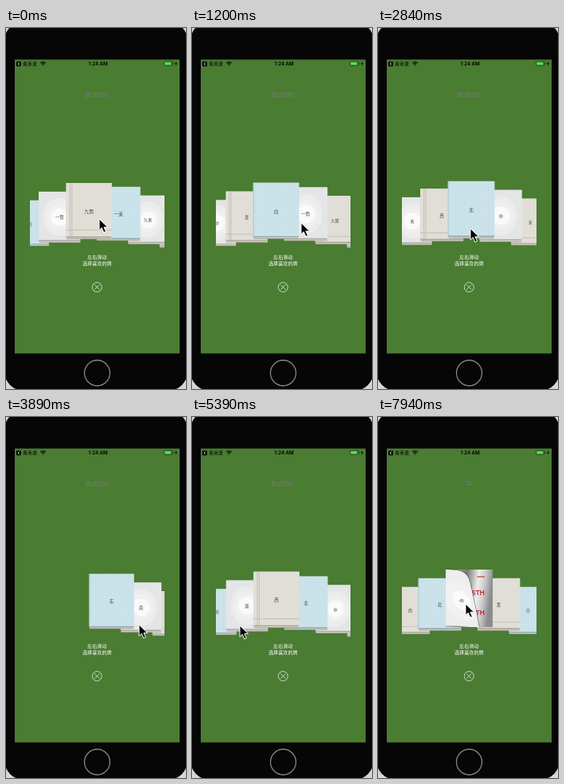
Recreate the animation shown at these times as an HTML page. Size 226 by 452 pixels, loop 8000 ms.

```html
<!DOCTYPE html>
<html lang="zh">
<head>
<meta charset="utf-8">
<style>
html, body { margin: 0; width: 100%; height: 100%; overflow: hidden; background: #d6d6d6; }
svg { display: block; width: 226px; height: 452px; }
text { font-family: "Noto Sans CJK SC", "Noto Sans CJK", "Noto Sans", sans-serif; text-anchor: middle; }
.latin { font-family: Inter, "Noto Sans CJK SC", sans-serif; }
</style>
</head>
<body>
<svg viewBox="0 0 226 452">
  <defs>
    <clipPath id="window"><rect x="30" y="180" width="169" height="110"/></clipPath>
    <pattern id="stripes" width="3" height="4" patternUnits="userSpaceOnUse">
      <rect width="3" height="4" fill="#cee5ec"/>
      <path d="M.8 0v4" stroke="#b9d5de" stroke-width=".8"/>
      <path d="M0 2h3" stroke="#d9edf2" stroke-width=".4"/>
    </pattern>
    <linearGradient id="under" x2="1" y2=".15">
      <stop offset="0" stop-color="#ddd"/>
      <stop offset=".45" stop-color="#777"/>
      <stop offset=".7" stop-color="#eee"/>
      <stop offset=".84" stop-color="#ccc"/>
      <stop offset="1" stop-color="#8c8c8c"/>
    </linearGradient>
    <clipPath id="coverClip"><path id="coverShape"/></clipPath>
    <g id="white">
      <rect x="-29.5" y="-36" width="59" height="69" fill="#e4e5e6"/>
      <ellipse rx="23" ry="27" fill="#ececed"/>
      <circle r="18" fill="#f0f0f1"/>
      <circle r="12.5" fill="#fafafa"/>
    </g>
    <g id="tan">
      <rect x="-29.5" y="-36" width="59" height="69" fill="#e0ded7"/>
      <path d="M-24.5 -36v69M-22 -36v69M-29.5 24.5h59" stroke="#b9b0a1" stroke-width=".7"/>
    </g>
    <g id="blue">
      <rect x="-29.5" y="-36" width="59" height="69" fill="url(#stripes)"/>
      <path d="M-29 -36v69" stroke="#a9c5ce"/>
    </g>
  </defs>

  <rect x="-2" y="-8" width="230" height="462" rx="24" fill="#060606"/>
  <rect x="11" y="39.5" width="207" height="368" fill="#4a7c32"/>
  <circle cx="114.5" cy="432" r="16" fill="none" stroke="#858585" stroke-width="1.3"/>

  <rect x="13" y="42" width="6" height="6" rx="1.2"/>
  <path d="M17 43.2l-2 1.8 2 1.8" fill="none" stroke="#fff" stroke-width=".8"/>
  <text x="30" y="46.9" font-size="6">青禾录</text>
  <g fill="none" stroke="#000" stroke-width="1.1">
    <path d="M43.3 43.8q3.2-2.6 6.4 0M44.6 45.4q1.9-1.5 3.8 0"/>
    <path d="M46 47h1"/>
  </g>
  <text class="latin" x="115.7" y="46.9" font-size="6.2" font-weight="600">1:24 AM</text>
  <rect x="198.5" y="42" width="10.5" height="5" rx="1" fill="none" stroke="#1d3015" stroke-width=".6"/>
  <rect x="199.3" y="42.8" width="7.6" height="3.4" fill="#55dd60"/>
  <path d="M210 43.5v2" stroke="#1d3015"/>
  <path d="M214.3 41.8l-2.3 3h1.4l-.7 2.6 2.4-3.2h-1.4z"/>

  <text id="title" class="latin" x="114" y="87.3" font-size="9.2" fill="#777b76">Button</text>
  <g id="deck" clip-path="url(#window)"></g>

  <g id="flip">
    <rect x="-29.5" y="-36" width="59" height="72" fill="url(#under)"/>
    <path d="M10 -27h9.5" stroke="#c33a40" stroke-width="1.2"/>
    <g fill="#c9262f" font-size="8" font-weight="700">
      <text class="latin" x="11" y="-3.6">STH</text>
      <text class="latin" x="11" y="21.2">STH</text>
    </g>
    <path id="coverShade" fill="none" stroke="#444" stroke-opacity=".55" stroke-width="2"/>
    <g clip-path="url(#coverClip)">
      <rect x="-30" y="-37" width="60" height="74" fill="#eceded"/>
      <g id="coverFace">
        <ellipse rx="20" ry="27" fill="#f1f1f2"/>
        <ellipse rx="10" ry="14" fill="#fafafa"/>
        <text y="2.4" font-size="6" fill="#444">中</text>
      </g>
    </g>
  </g>

  <g fill="#fff" font-size="6.1">
    <text x="114.3" y="289.3">左右滑动</text>
    <text x="114.3" y="296.5">选择喜欢的牌</text>
  </g>
  <g fill="none" stroke="#e8eee5" stroke-width=".8">
    <circle cx="114.3" cy="324.5" r="6"/>
    <path d="M111.3 321.5l6 6m0-6l-6 6"/>
  </g>
  <path id="cursor" d="M0 0V14.2L3.3 11.2L5.8 17L8.4 15.9L5.9 10.3H10.6Z" stroke="#fff" stroke-width="1"/>
</svg>

<script>
const $ = id => document.getElementById(id);
const LOOP = 8000, MID = 114.5, GAP = 37;
const names = "东 南 西 北 中 发 白 一筒 九筒 一束 九束 一万".split(" ");
const skins = [["blue", "#8aa5ab"], ["white", "#aaa8a4"], ["tan", "#a89e90"]];

// Keys: time, then values
const scrollKeys = [[0, 8.28], [1200, 6.24], [2240, 4.2], [2840, 2.93], [3440, 1], [3890, -.49],
  [4340, 0], [4640, 0], [5390, 2.23], [6290, 3.79], [6890, 3.97], [7040, 4]];
const cursorKeys = [[0, 117, 239], [1200, 137, 244], [2840, 116, 251], [3290, 140, 260], [3890, 167, 260],
  [4340, 157, 257], [4490, 157, 258], [4640, 157, 258], [5390, 60, 261], [6290, 84, 248], [7040, 110, 234]];

const cards = names.map((name, i) => {
  const [skin, edge] = skins[i % 3];
  const g = document.createElementNS("http://www.w3.org/2000/svg", "g");
  g.innerHTML = `<rect x="-29" y="32" width="58.5" height="4" fill="#e9e6df"/>
    <use href="#${skin}"/>
    <path d="M-29.5 33.4h58.5" stroke="${edge}" stroke-width="1.6"/>
    <path d="M-28.5 35.6h57.5" stroke="#8e8779" stroke-width=".8"/>
    <text y="2.8" font-size="6" fill="#444">${name}</text>`;
  return { g, i };
});

// Monotone cubic through the keys
function sample(keys, t, c = 1) {
  const slope = k => k < 0 || k > keys.length - 2 ? 0
    : (keys[k + 1][c] - keys[k][c]) / (keys[k + 1][0] - keys[k][0]);
  const tangent = k => {
    const a = slope(k - 1), b = slope(k);
    if (k === 0) return b;
    return a * b > 0 ? 2 * a * b / (a + b) : 0;
  };
  const last = keys.length - 1;
  if (t >= keys[last][0]) return keys[last][c];
  const k = keys.findIndex((key, n) => t < keys[n + 1][0]);
  const h = keys[k + 1][0] - keys[k][0], u = (t - keys[k][0]) / h, v = 1 - u;
  return keys[k][c] * (1 + 2 * u) * v * v + keys[k + 1][c] * (3 - 2 * u) * u * u
    + h * u * v * (tangent(k) * v - tangent(k + 1) * u);
}

function drawDeck(pos) {
  for (const card of cards) {
    const d = card.i - pos, far = Math.abs(d);
    card.far = far;
    card.g.setAttribute("transform",
      `translate(${MID + GAP * d} ${227 + 7.6 * far}) scale(${Math.max(.1, 1 - .09 * far)})`);
  }
  $("deck").append(...[...cards].sort((a, b) => b.far - a.far).map(card => card.g));
}

function drawFlip(c) {
  $("flip").style.display = c > 0 ? "" : "none";
  const mix = (a, b) => a + (b - a) * c;
  const edge = `${mix(29.5, -27)} -36C${mix(29.5, -8)} -35 ${mix(29.5, 0)} ${mix(-30, -34)} ${mix(29.5, 3)} -10`
    + `L${mix(29.5, 12.5)} 36`;
  $("coverShape").setAttribute("d", `M-29.5 -36L${edge}L-29.5 ${mix(36, 34)}Z`);
  $("coverShade").setAttribute("d", "M" + edge);
  $("coverFace").setAttribute("transform", `translate(${-9.5 * c} ${3 * c}) rotate(${-14 * c}) skewX(${12 * c})`);
  $("flip").setAttribute("transform", `translate(${MID} 227)`);
}

function step(t) {
  return t < 2240 ? Math.floor(t / 150) * 150 : 2240 + Math.floor((t - 2240) / 150) * 150;
}

function draw(now) {
  const t = step(now % LOOP);
  drawDeck(sample(scrollKeys, t));
  drawFlip(Math.min(1, Math.max(0, (t - 7640) / 300)));
  $("title").textContent = t < 7640 ? "Button" : "中";
  $("cursor").setAttribute("transform",
    `translate(${sample(cursorKeys, t, 1)} ${sample(cursorKeys, t, 2)})`);
}

const start = performance.now();
function tick() {
  draw(performance.now() - start);
  requestAnimationFrame(tick);
}
tick();
</script>
</body>
</html>
```
